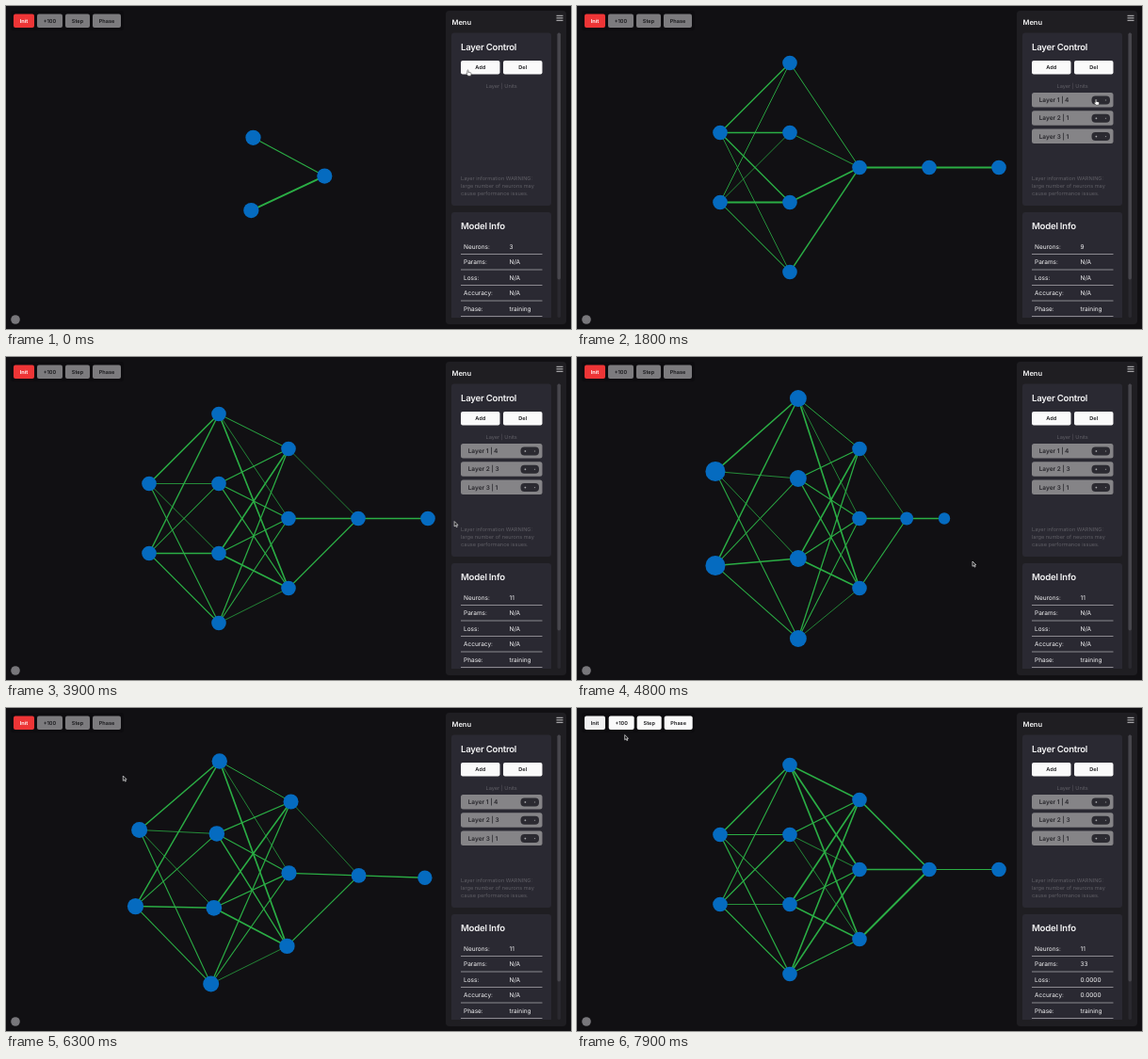
Animation of 600x343 px, one loop 8000 ms. Source, as an HTML page with a canvas:

```html
<!DOCTYPE html>
<html lang="en">
<head>
<meta charset="utf-8">
<title>Neural network builder</title>
<style>
html, body { margin: 0; width: 100%; height: 100%; overflow: hidden; background: #111013; }
#stage { position: relative; width: 600px; height: 343px; overflow: hidden; }
canvas, svg { position: absolute; left: 0; top: 0; width: 600px; height: 343px; }
text { font-family: Inter, sans-serif; font-size: 6.5px; fill: #f4f4f5; text-rendering: geometricPrecision; }
.menu { font-size: 7.5px; font-weight: 600; }
.title { font-size: 9.6px; font-weight: 600; letter-spacing: -.025em; }
.btn { font-size: 5.6px; font-weight: 600; text-anchor: middle; fill: #18181b; }
.note { font-size: 5.6px; fill: #5f5e65; }
.row { font-weight: 600; fill: #27262b; }
.tool rect { fill: #7c7b7e; }
.tool.on rect { fill: #fafafa; }
.tool.init rect { fill: #ee3536; }
.tool.init text { fill: #fff; }
.tool.init.on rect { fill: #f1f1f2; }
.tool.init.on text { fill: #18181b; }
</style>
</head>
<body>
<div id="stage">
<canvas id="net"></canvas>
<svg id="ui" viewBox="0 0 600 343">
  <rect x="5" y="5" width="120" height="21" rx="3" fill="#0d0c0f"/>
  <g id="tools"></g>
  <circle cx="10" cy="333" r="4.8" fill="#78777b"/>
  <rect x="467" y="5" width="128" height="333" rx="4" fill="#1f1e22"/>
  <text class="menu" x="473.5" y="19.8">Menu</text>
  <path d="M584.5 10.3h7M584.5 12.8h7M584.5 15.3h7" stroke="#d8d8da" stroke-width=".9"/>
  <rect x="585.5" y="28.5" width="3.5" height="302.5" rx="1.7" fill="#2a292f"/>
  <rect x="585.5" y="28.5" width="3.5" height="262" rx="1.7" fill="#47464c"/>
  <rect x="473" y="28.5" width="106" height="183.5" rx="3" fill="#2a2932"/>
  <path d="M473 331V222q0-3 3-3h100q3 0 3 3v109z" fill="#2a2932"/>
  <text class="title" x="483" y="47.3">Layer Control</text>
  <rect x="483" y="58" width="41.5" height="14.5" rx="2" fill="#fafafa"/>
  <rect x="528" y="58" width="41.5" height="14.5" rx="2" fill="#fafafa"/>
  <text class="btn" x="503.7" y="67.3">Add</text>
  <text class="btn" x="548.7" y="67.3">Del</text>
  <text class="note" x="526.2" y="86.7" text-anchor="middle">Layer | Units</text>
  <g id="rows"></g>
  <text class="note" x="483" y="184.6">Layer information WARNING:</text>
  <text class="note" x="483" y="192.6">large number of neurons may</text>
  <text class="note" x="483" y="200.6">cause performance issues.</text>
  <text class="title" x="483" y="236.6">Model Info</text>
  <g id="stats"></g>
  <g id="pointer" stroke-linejoin="round">
    <path id="arrow" fill="#111" stroke="#e8e8ea" stroke-width=".7" d="M0 0V5.3L1.3 4.2 2.2 6.1 3.1 5.7 2.2 3.8H3.8Z"/>
    <path id="hand" fill="#fff" stroke="#222" stroke-width=".5" d="M-.6 .5Q0-.5.6 .5V2.4L3 2.9Q3.7 3.2 3.6 4L3.1 6.2H.2L-1.7 3.9Q-1.5 3-.6 3.5Z"/>
  </g>
</svg>
</div>
<script>
const LOOP = 8000, STEP = 100, GAP = 74, DEPTH = 367, RADIUS = 7.8, INIT = 7300;

// When each hidden layer is added, and when layers 1 and 2 gain a unit
const layerClicks = [300, 500, 800];
const unitClicks = [[1400, 1600, 1800], [3000, 3300], []];

// time, x, y of the pointer tip
const pointerPath = [
  [0, 490.5, 68], [1000, 516.5, 70], [1300, 551, 99], [2400, 551, 99],
  [2800, 551, 118], [3500, 551, 118], [4200, 420, 217], [5100, 420, 217],
  [5700, 418.5, 203], [6300, 124.3, 72], [6700, 20, 15], [7400, 20, 15],
  [7900, 50.7, 28.5]
];

const $ = id => document.getElementById(id);
const rad = deg => deg * Math.PI / 180;
const countBefore = (times, t) => times.filter(at => at <= t).length;

function ramp(t, from, to) {
  const p = Math.min(1, Math.max(0, (t - from) / (to - from)));
  return p * p * (3 - 2 * p);
}

function random(seed) {
  return () => {
    seed = (seed * 1664525 + 1013904223) % 4294967296;
    return seed / 4294967296;
  };
}

function add(parent, tag, attrs, label) {
  const el = document.createElementNS("http://www.w3.org/2000/svg", tag);
  for (const key in attrs) el.setAttribute(key, attrs[key]);
  if (label) el.textContent = label;
  return parent.appendChild(el);
}

const tools = [["Init", 8, 22], ["+100", 33, 27], ["Step", 63, 26], ["Phase", 92, 30]]
  .map(([label, x, width], i) => {
    const g = add($("tools"), "g", { class: i ? "tool" : "tool init" });
    add(g, "rect", { x, y: 8.5, width, height: 14.5, rx: 2 });
    add(g, "text", { class: "btn", x: x + width / 2, y: 17.8 }, label);
    return g;
  });

const rows = layerClicks.map((_, i) => {
  const g = add($("rows"), "g", { transform: `translate(483 ${92 + i * 19.3})` });
  add(g, "rect", { width: 86.5, height: 15.5, rx: 2.5, fill: "#858487" });
  const label = add(g, "text", { class: "row", x: 7.7, y: 10.1 });
  add(g, "rect", { x: 63.5, y: 3.5, width: 19.5, height: 9, rx: 4, fill: "#2b2a31" });
  add(g, "path", { d: "M67.5 8h1.8M68.4 7.1v1.8M77.9 8h1.2", stroke: "#d0d0d3", "stroke-width": .6 });
  return { g, label };
});

const stats = ["Neurons:", "Params:", "Loss:", "Accuracy:", "Phase:"].map((name, i) => {
  const y = 257.8 + i * 16.5;
  add($("stats"), "text", { x: 486, y }, name);
  add($("stats"), "path", { d: `M483 ${y + 5.7}h86.5`, stroke: "#a5a4a9", "stroke-width": .8 });
  return add($("stats"), "text", { x: 534.5, y });
});

const ratio = Math.max(1, window.devicePixelRatio || 1);
const ctx = $("net").getContext("2d");
$("net").width = 600 * ratio;
$("net").height = 343 * ratio;
ctx.scale(ratio, ratio);

// The view settles, is dragged sideways, tilted, then springs back
function viewAt(t) {
  const intro = 1 - ramp(t, 0, 1000);
  const drag = ramp(t, 3900, 4500), lift = ramp(t, 5100, 5700), back = ramp(t, 5700, 6600);
  const sway = intro + lift - ramp(t, 6200, 7000);
  const tilt = lift - back;
  return {
    yaw: rad(2 * intro + 40 * drag - 10 * lift - 30 * back),
    pitch: rad(12.5 * tilt),
    roll: rad(1.6 * sway),
    zoom: 1 + .04 * sway,
    cx: 300 + 2 * tilt,
    cy: 171.5 + 4 * sway + 4 * intro
  };
}

function project(x, y, { yaw, pitch, roll, zoom, cx, cy }) {
  const z = x * Math.sin(yaw), px = x * Math.cos(yaw);
  const py = y * Math.cos(pitch) + z * Math.sin(pitch);
  const pz = z * Math.cos(pitch) - y * Math.sin(pitch);
  const f = zoom * DEPTH / (DEPTH + pz);
  return {
    x: cx + f * (px * Math.cos(roll) - py * Math.sin(roll)),
    y: cy + f * (px * Math.sin(roll) + py * Math.cos(roll)),
    f
  };
}

function drawNetwork(layers, build, view) {
  const middle = (layers.length - 1) / 2;
  const nodes = layers.map((n, i) => Array.from({ length: n }, (_, j) =>
    project((i - middle) * GAP, (j - (n - 1) / 2) * GAP, view)));
  const rnd = random(build * 7919 + 17);
  ctx.clearRect(0, 0, 600, 343);
  ctx.strokeStyle = "#2bae45";
  for (let i = 1; i < nodes.length; i++) {
    // Weights start within a range set by the sizes of both layers
    const limit = Math.sqrt(6 / (layers[i - 1] + layers[i]));
    for (const p of nodes[i - 1])
      for (const q of nodes[i]) {
        ctx.lineWidth = .7 + 1.1 * limit * rnd();
        ctx.beginPath();
        ctx.moveTo(p.x, p.y);
        ctx.lineTo(q.x, q.y);
        ctx.stroke();
      }
  }
  ctx.fillStyle = "#056bc0";
  for (const p of nodes.flat().sort((p, q) => p.f - q.f)) {
    ctx.beginPath();
    ctx.arc(p.x, p.y, RADIUS * p.f, 0, 2 * Math.PI);
    ctx.fill();
  }
}

function pointerAt(t) {
  const n = pointerPath.findIndex(k => k[0] > t);
  if (n < 0) return pointerPath[pointerPath.length - 1].slice(1);
  const [t0, x0, y0] = pointerPath[n - 1], [t1, x1, y1] = pointerPath[n];
  const p = (t - t0) / (t1 - t0);
  return [x0 + (x1 - x0) * p, y0 + (y1 - y0) * p];
}

function drawPointer(t) {
  const [x, y] = pointerAt(t);
  const inside = (l, top, r, b) => x > l && x < r && y > top && y < b;
  const hand = inside(483, 58, 569, 73) || inside(546, 95, 566, 105) ||
    inside(546, 114, 566, 124) || inside(8, 8, 123, 23);
  $("pointer").setAttribute("transform", `translate(${x} ${y})`);
  $("hand").style.display = hand ? "" : "none";
  $("arrow").style.display = hand ? "none" : "";
}

function drawPanel(t, hidden, total) {
  const ready = t >= INIT;
  tools.forEach((g, i) => {
    g.classList.toggle("on", ready);
    g.setAttribute("transform", `translate(${ready && i ? .7 : 0} 0)`);
  });
  rows.forEach(({ g, label }, i) => {
    g.style.display = i < hidden.length ? "" : "none";
    label.textContent = `Layer ${i + 1} | ${hidden[i]}`;
  });
  const results = ready ? ["33", "0.0000", "0.0000"] : ["N/A", "N/A", "N/A"];
  [total, ...results, "training"].forEach((v, i) => stats[i].textContent = v);
}

const start = performance.now();
function frame() {
  const t = Math.floor((performance.now() - start) % LOOP / STEP) * STEP;
  const hidden = unitClicks.slice(0, countBefore(layerClicks, t))
    .map(times => 1 + countBefore(times, t));
  const layers = [2, ...hidden, 1];
  const build = countBefore([...layerClicks, ...unitClicks.flat(), INIT], t);
  drawNetwork(layers, build, viewAt(t));
  drawPanel(t, hidden, layers.reduce((a, b) => a + b));
  drawPointer(t);
  requestAnimationFrame(frame);
}
frame();
</script>
</body>
</html>
```
